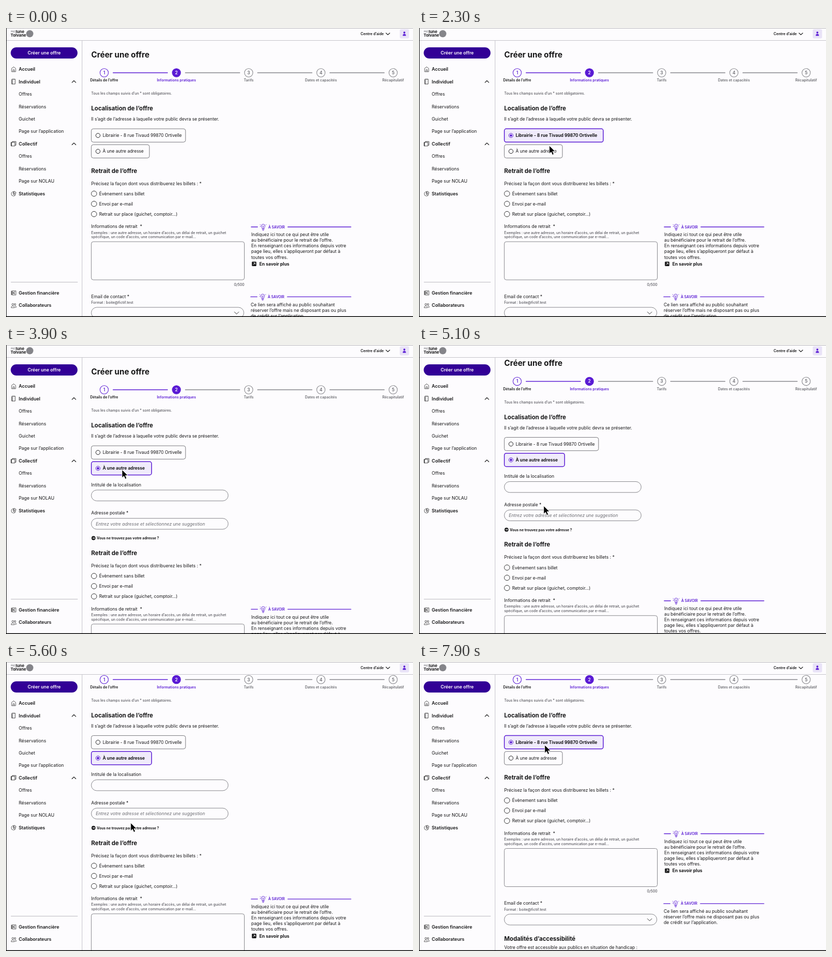
An HTML page for the animation above (8 s loop, 800 px wide and 568 px high).

```html
<!DOCTYPE html>
<html lang="fr">
<head>
<meta charset="utf-8">
<title>Créer une offre</title>
<style>
  html, body { margin: 0; width: 100%; height: 100%; overflow: hidden; background: #fdfcfe; }
  svg { display: block; width: 100vw; height: 100vh; font-family: Inter, "Open Sans", sans-serif; }
</style>
</head>
<body>
<svg id="stage" viewBox="0 0 800 568">
  <g id="page"></g>
  <g id="chrome"></g>
  <path id="cursor" d="M0 0V16.2L3.8 12.7 6.3 18.5 9.2 17.2 6.7 11.6H11.8Z" stroke="#fff" stroke-width="1"/>
</svg>
<script>
const INK = '#161617', GREY = '#696a6f', LINE = '#85858a', PURPLE = '#5a1bd4', DEEP = '#320096', TINT = '#f0ebfb', BG = '#fdfcfe';
const LOOP = 8000, ADDRESS_BLOCK = 128.4;
const $ = id => document.getElementById(id);

// y is the optical middle of the line
const text = (x, y, str, size = 8.7, weight = 400, fill = INK, more = '') =>
  `<text x="${x}" y="${y + size * .36}" font-size="${size}" font-weight="${weight}" fill="${fill}" ${more}>${str}</text>`;
const middle = (x, y, str, size, weight, fill) => text(x, y, str, size, weight, fill, 'text-anchor="middle"');
const heading = (y, str, size = 11.6) => text(167.5, y, str, size, 700);
const hint = (y, str) => text(167.5, y, str, 7, 500, '#55555b');
const rect = (x, y, w, h, r, stroke = LINE, fill = 'none', sw = 1) =>
  `<rect x="${x}" y="${y}" width="${w}" height="${h}" rx="${r}" stroke="${stroke}" fill="${fill}" stroke-width="${sw}"/>`;
const circle = (x, y, r, stroke = INK, fill = 'none', sw = 1) =>
  `<circle cx="${x}" cy="${y}" r="${r}" stroke="${stroke}" fill="${fill}" stroke-width="${sw}"/>`;
const path = (d, stroke = INK, sw = 1, fill = 'none') =>
  `<path d="${d}" stroke="${stroke}" stroke-width="${sw}" fill="${fill}" stroke-linecap="round" stroke-linejoin="round"/>`;
const group = (x, y, body) => `<g transform="translate(${x} ${y})">${body}</g>`;

function stepper() {
  const names = ['Détails de l’offre', 'Informations pratiques', 'Tarifs', 'Dates et capacités', 'Récapitulatif'];
  return names.map((name, i) => {
    const x = 193 + 142 * i, tone = i < 2 ? PURPLE : GREY;
    return circle(x, 88, 8.2, i < 2 ? PURPLE : LINE, i === 1 ? PURPLE : 'none', 1.1)
      + middle(x, 88, i + 1, 8.5, 600, i === 1 ? '#fff' : tone)
      + middle(x, 102.7, name, 7, 600, i ? tone : INK)
      + (i < 4 ? path(`M${x + 17.5} 88H${x + 124.5}`, i ? LINE : PURPLE, 1.5) : '');
  }).join('');
}

function option(y, label, widths, on) {
  const tone = on ? PURPLE : INK;
  return rect(167.7, y, widths[+on], 26.2, 4, on ? PURPLE : '#77777c', on ? TINT : BG, on ? 1.5 : 1)
    + circle(180.8, y + 13.1, 4.2, tone) + (on ? circle(180.8, y + 13.1, 2.3, 'none', PURPLE) : '')
    + text(190, y + 13.1, label, 8.5, on ? 700 : 400);
}

const radio = (y, label) => circle(173, y, 5.3, '#333') + text(183, y, label);

const bulb = path('M-2 3.2C-2.6 1-4-.1-3.6-2.6A3.7 3.7 0 0 1 3.7-2C3.6.2 2.2 1.2 2 3.2ZM-1.8 5H1.8M-1 6.6H1M0 3V-.5L-1.3-2M0-.5L1.3-2', PURPLE, .8, TINT)
  + path('M-5.2-4.2L-6.2-4.8M-5-1H-6.2M5.2-4.2L6.2-4.8', PURPLE, .7);

const tip = (x, y, lines) => path(`M${x} ${y}h12.5M${x + 72} ${y}H678`, PURPLE, 1.4) + group(x + 23.5, y, bulb)
  + text(x + 33.5, y, 'À SAVOIR', 7, 600, PURPLE)
  + lines.map((line, i) => text(x, y + 15 + 11.1 * i, line, 8.75)).join('');

const addressForm = () => text(167.5, 274.5, 'Intitulé de la localisation') + rect(167.7, 285, 269, 21.4, 10.7)
  + text(167.5, 330, 'Adresse postale *') + rect(167.7, 340.7, 269, 21.4, 10.7)
  + text(176.5, 351.4, 'Entrez votre adresse et sélectionnez une suggestion', 8.7, 400, GREY, 'font-style="italic"')
  + circle(172, 379.5, 3.9, 'none', INK) + path('M170 379.5H174M172.5 378L174 379.5 172.5 381', '#fff', .9)
  + text(178.5, 379.6, 'Vous ne trouvez pas votre adresse ?', 6.95, 700);

const details = () => heading(280.5, 'Retrait de l’offre')
  + text(167.5, 305.5, 'Précisez la façon dont vous distribuerez les billets : *')
  + radio(325.6, 'Évènement sans billet') + radio(345.6, 'Envoi par e-mail') + radio(365.7, 'Retrait sur place (guichet, comptoir…)')
  + text(167.5, 390, 'Informations de retrait&nbsp; *')
  + hint(402, 'Exemples : une autre adresse, un horaire d’accès, un délai de retrait, un guichet')
  + hint(410.6, 'spécifique, un code d’accès, une communication par e-mail…')
  + rect(167.7, 420, 300.8, 75, 4)
  + text(468.5, 504, '0/500', 7, 500, '#55555b', 'text-anchor="end"')
  + tip(482, 391, ['Indiquez ici tout ce qui peut être utile', 'au bénéficiaire pour le retrait de l’offre.',
      'En renseignant ces informations depuis votre', 'page lieu, elles s’appliqueront par défaut à', 'toutes vos offres.'])
  + rect(483.3, 459.2, 8.8, 8.8, 1.3, 'none', INK) + path('M485.8 465.4L489.6 461.7M486.8 461.7H489.6V464.5', '#fff', .9)
  + text(498, 463.7, 'En savoir plus', 8.7, 700)
  + text(167.5, 527.4, 'Email de contact *') + hint(539.7, 'Format : boite@fictif.test')
  + rect(167.7, 549, 299.8, 21.4, 10.7) + path('M449 558L453.3 562.3 457.6 558', '#333')
  + tip(481, 528.4, ['Ce lien sera affiché au public souhaitant', 'réserver l’offre mais ne disposant pas ou plus', 'de crédit sur l’application.'])
  + heading(597.7, 'Modalités d’accessibilité')
  + text(167.5, 614.4, 'Votre offre est accessible aux publics en situation de handicap :');

// choice: 0 nothing, 1 first address, 2 another address
const page = choice => heading(52.2, 'Créer une offre', 15.5) + stepper()
  + text(167.5, 128.8, 'Tous les champs suivis d’un * sont obligatoires.', 7, 500, '#55555b')
  + heading(158, 'Localisation de l’offre')
  + text(167.5, 179, 'Il s’agit de l’adresse à laquelle votre public devra se présenter.', 8.6)
  + option(198.1, 'Librairie - 8 rue Tivaud 99870 Ortivelle', [185.2, 194.5], choice === 1)
  + option(229.3, 'À une autre adresse', [114.2, 118.5], choice === 2)
  + (choice === 2 ? addressForm() : '')
  + group(0, choice === 2 ? ADDRESS_BLOCK : 0, details());

const icons = {
  home: path('M-4 4.5V-1.5L0-4.7 4-1.5V4.5ZM-1.2 4.5V1H1.4V4.5', '#333', .8),
  phone: path('M-3-4.8H3V4.8H-3ZM-1-4.6H1', '#333', .9) + path('M-3.2-3V4.5', INK, 1.2),
  cards: path('M-4.5-3H2.5V4.2H-4.5ZM-2.5-3V-4.6H4.6V2.6H2.5', '#333', .9) + path('M-4.4-2.6V3.8', INK, 1.3),
  pie: path('M-.7-3.7A4.2 4.2 0 1 0 3.8.8H-.7ZM1-4.6A4 4 0 0 1 4.8-.9H1ZM-.7.8L2.4 3.8', '#333', .8),
  coins: path('M-2-4H4.5V4.2H-2ZM-4.6-3.6V3.8M-3.3-3.8V4M2.6-2A2.3 2.3 0 1 0 2.6 2M-.8-.5H1.6M-.8.7H1.6', '#333', .8),
  people: circle(-1.6, -2, 1.8, '#333', 'none', .8) + circle(2.7, -2.2, 1.5, '#333', 'none', .8)
    + path('M-4.8 4.2C-4.8-.2 1.5-.2 1.5 4.2ZM2.2 .8C4-.1 5 1.6 5 3.8H3', '#333', .8)
};

function chrome() {
  const main = [['Accueil', 81, 'home'], ['Individuel', 105.3, 'phone'], ['Collectif', 227.7, 'cards'],
    ['Statistiques', 325.5, 'pie'], ['Gestion financière', 520.6, 'coins'], ['Collaborateurs', 545.2, 'people']];
  const sub = [['Offres', 130], ['Réservations', 154.5], ['Guichet', 179], ['Page sur l’application', 203.3],
    ['Offres', 252.2], ['Réservations', 276.7], ['Page sur NOLAU', 301.1]];
  return `<path d="M0 0H800V24.5H149.5V568H0Z" fill="${BG}"/>`
    + path('M0 24.5H800M149.5 25V567', '#c4c3c9', 1) + path('M10 499.5H140.5', '#b9b8be', 1)
    + text(9.5, 7, 'PRO', 4.2, 500, GREY) + text(19, 7, 'lune', 8, 700) + text(9, 14.4, 'Tolvane', 7.9, 700)
    + circle(46.7, 11.3, 7, 'none', '#85858a')
    + text(697, 11.5, 'Centre d’aide', 7.1, 600) + path('M747 10L750.6 13.4 754.2 10', INK, 1.2)
    + rect(774, 2.3, 18.3, 18.3, 3, 'none', '#e9e3f7')
    + circle(783, 9, 1.9, 'none', PURPLE) + path('M780.2 15V13.8C780.2 11.3 785.8 11.3 785.8 13.8V15Z', PURPLE, .4, PURPLE)
    + rect(9.3, 38, 131.3, 22, 11, 'none', DEEP) + middle(75, 49, 'Créer une offre', 8.9, 600, '#fff')
    + main.map(([name, y, icon]) => group(15, y, icons[icon]) + text(25, y, name, 9, 600)).join('')
    + sub.map(([name, y]) => text(25, y, name, 8.8)).join('')
    + [105.3, 227.7].map(y => path(`M129.8 ${y + 1.8}L133.5 ${y - 1.8} 137.2 ${y + 1.8}`, INK, 1.2)).join('')
    + '<path d="M0 0H1V566.5H800V568H0Z"/><path d="M0 0H800V.6H0Z" fill="#77767b"/>';
}

// [time, value...]
const scrollKeys = [[4880, 0], [5300, 31.5], [5600, 53.5]];
const cursorKeys = [[500, 430, 570], [1350, 262, 214], [1950, 260, 213], [2300, 256, 231], [2800, 228, 245],
  [4200, 228, 245], [4800, 245, 316], [6400, 245, 316], [6900, 246, 292], [7400, 247, 163]];
const choiceKeys = [[0, 0], [1600, 1], [3100, 2], [7600, 1]];

function at(keys, t, ease = p => p) {
  const next = keys.findIndex(key => key[0] > t);
  if (next <= 0) return keys[next ? keys.length - 1 : 0].slice(1);
  const a = keys[next - 1], b = keys[next], p = ease((t - a[0]) / (b[0] - a[0]));
  return a.slice(1).map((v, i) => v + (b[i + 1] - v) * p);
}
const smooth = p => p * p * (3 - 2 * p);

let shown;
function draw(now) {
  const t = now % LOOP;
  const choice = choiceKeys.filter(key => key[0] <= t).pop()[1];
  if (choice !== shown) $('page').innerHTML = page(shown = choice);
  $('page').setAttribute('transform', `translate(0 ${-at(scrollKeys, t)[0]})`);
  $('cursor').setAttribute('transform', `translate(${at(cursorKeys, t, smooth)})`);
  $('cursor').setAttribute('visibility', t < 500 ? 'hidden' : 'visible');
}

$('chrome').innerHTML = chrome();
draw(0);
const start = performance.now();
requestAnimationFrame(function tick() {
  draw(performance.now() - start);
  requestAnimationFrame(tick);
});
</script>
</body>
</html>
```
